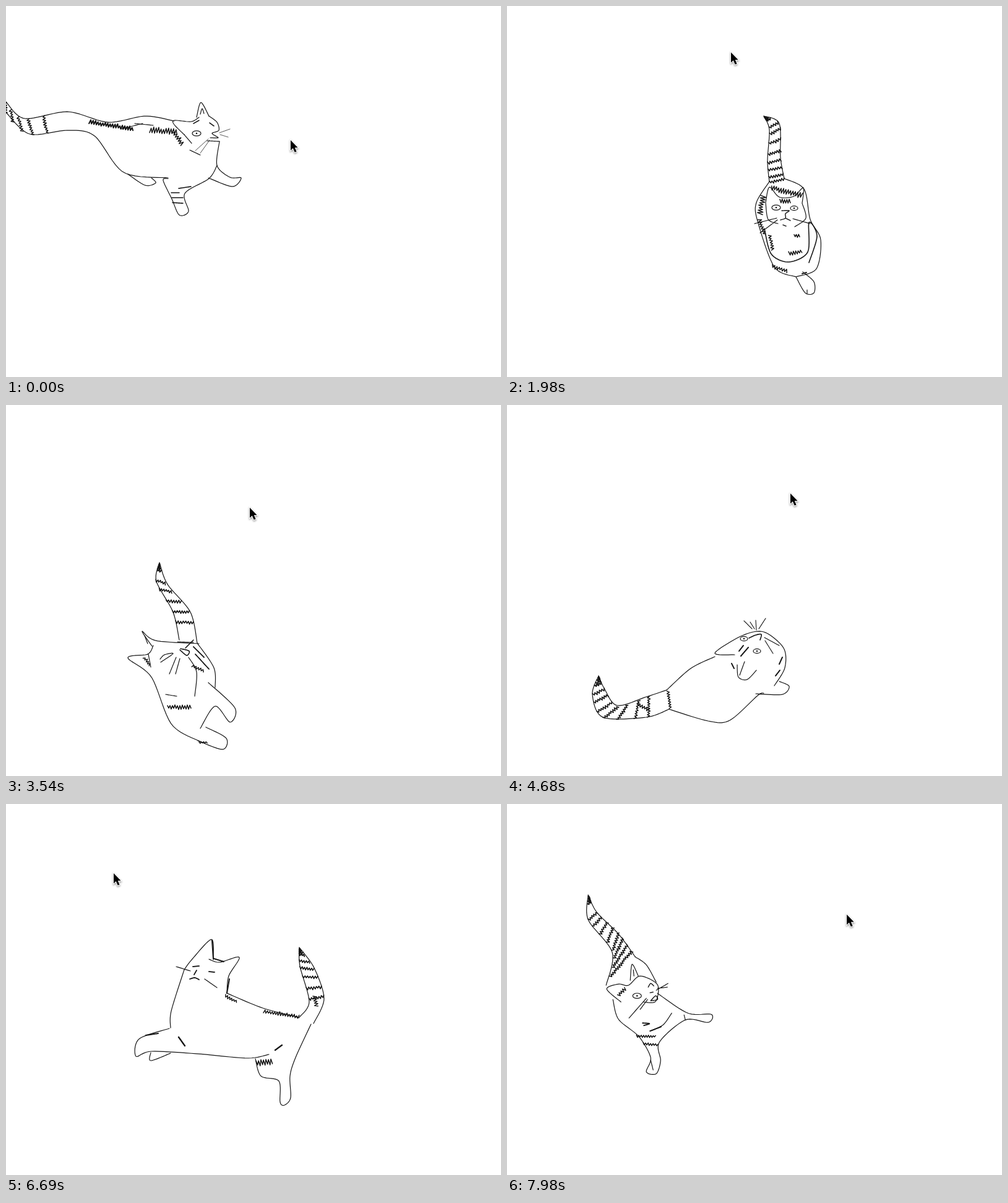
Animation of 800 by 600 pixels, one loop 8 s. Source, as an HTML page with a canvas:

```html
<!DOCTYPE html>
<html>
<head>
<meta charset="utf-8">
<title>Cat and pointer</title>
<style>
html, body { margin: 0; width: 100%; height: 100%; overflow: hidden; background: #fff; }
canvas { display: block; width: 100vw; height: 100vh; }
</style>
</head>
<body>
<canvas id="stage" width="800" height="600"></canvas>
<script>
const ctx = document.getElementById("stage").getContext("2d");
const LOOP = 8000, STEP = 30;

const mix = (a, b, u) => a + (b - a) * u;

function points(text) {
  const n = text.trim().split(/\s+/).map(Number);
  return n.filter((v, i) => i % 2 === 0).map((x, i) => [x, n[i * 2 + 1]]);
}

// Point on a smooth curve through p; u runs over the whole curve.
function along(p, u) {
  const last = p.length - 1;
  const i = Math.min(last - 1, Math.floor(u * last)), s = u * last - i;
  const at = k => p[Math.max(0, Math.min(last, k))];
  const [a, b, c, d] = [at(i - 1), at(i), at(i + 1), at(i + 2)];
  return [0, 1].map(k => {
    const m = (c[k] - a[k]) * 0.45, n = (d[k] - b[k]) * 0.45;
    const e = c[k] - b[k];
    return b[k] + m * s + (3 * e - 2 * m - n) * s * s + (m + n - 2 * e) * s ** 3;
  });
}

// Pen strokes through "x y x y"; "/" lifts the pen.
function ink(text, width = 1.2) {
  ctx.lineWidth = width;
  ctx.beginPath();
  for (const part of text.split("/")) {
    const p = points(part), n = p.length * 8;
    ctx.moveTo(...p[0]);
    for (let i = 1; i <= n; i++) ctx.lineTo(...along(p, i / n));
  }
  ctx.stroke();
}

// Scribbled zigzag with teeth of height h to one side.
function fur(x0, y0, x1, y1, h, width = 1.5) {
  const dx = x1 - x0, dy = y1 - y0, len = Math.hypot(dx, dy);
  const total = Math.max(4, Math.round(len / 2));
  ctx.lineWidth = width;
  ctx.beginPath();
  for (let i = 0; i <= total; i++) {
    const noise = Math.abs(Math.sin(i * 12.9 + x0) * 43.7) % 1;
    const k = h / len * (i % 2 ? 0.65 + noise * 0.4 : noise * 0.2);
    ctx.lineTo(mix(x0, x1, i / total) - dy * k, mix(y0, y1, i / total) + dx * k);
  }
  ctx.stroke();
}

// Two tail edges with a dark tip and rings between them.
function tail(left, right, rings, from, to, tip = true, inset = 0) {
  ink(left);
  ink(right);
  const a = points(left), b = points(right);
  const rung = (u, h, width) => {
    const p = along(a, u), q = along(b, u);
    fur(mix(p[0], q[0], inset), mix(p[1], q[1], inset),
      mix(q[0], p[0], inset), mix(q[1], p[1], inset), h, width);
  };
  for (let i = 0; i < rings; i++) rung(mix(from, to, i / (rings - 1)), 5, 1.6);
  if (tip) for (let i = 1; i < 5; i++) rung(i * 0.035, 4, 2);
}

function eye(x, y, r) {
  ctx.lineWidth = 1.2;
  ctx.beginPath();
  ctx.ellipse(x, y, r, r * 0.6, 0, 0, 7);
  ctx.stroke();
  ctx.beginPath();
  ctx.arc(x, y, 1.3, 0, 7);
  ctx.fill();
}

const poses = {
  side() {
    tail("0 155 30 182 100 171 165 188 225 178 272 186",
      "0 172 38 207 100 201 143 210 190 269 262 278", 5, 0.02, 0.3, false);
    ink("197 272 225 290 242 286 235 278");
    ink("262 279 254 282 268 312 280 338 295 332 289 303 328 279 341 258");
    ink("345 219 341 258 362 277 380 278 366 292 327 278");
    ink("267 302 280 302 / 268 310 286 310 / 269 318 286 319 / 279 295 299 292", 1.6);
    ink("288 208 272 192 272 185 299 187 312 180 / 308 180 315 156 328 178 / 314 175 317 166 320 174");
    ink("328 178 341 188 344 201 333 206 343 213 330 213 / 288 208 300 222 / 325 218 345 219");
    ink("303 190 312 185 / 329 189 336 194", 1.6);
    eye(308, 206, 7);
    ink("327 215 306 234 / 329 217 314 238 / 345 205 362 199 / 346 208 359 212", 0.8);
    ink("297 233 314 241 / 186 199 221 190 / 208 190 238 193");
    fur(134, 191, 205, 202, -7, 2);
    fur(232, 205, 276, 209, -10);
    fur(268, 206, 282, 226, -8);
  },

  front() {
    tail("415 178 424 200 421 250 424 284", "415 178 440 190 442 245 448 279", 8, 0.28, 0.98);
    ink("424 284 403 318 405 348 432 422 467 438 / 448 279 480 296 490 345 507 378 500 425 467 438");
    ink("416 360 427 401 455 414 486 398 488 350 501 372 488 415", 1.6);
    ink("467 438 482 464 496 464 496 446 478 430 / 485 466 485 459");
    ink("477 433 484 431", 2);
    ink("418 318 424 293 440 309 463 308 479 294 477 319 / 418 318 422 345 438 352 / 477 319 483 343 465 357");
    eye(435, 326, 7);
    eye(464, 327, 6);
    ink("444 331 456 331 450 336 450 343 442 346 / 450 343 458 347 / 446 354 451 356", 1.4);
    ink("436 343 400 352 / 437 346 409 367 / 462 344 490 352");
    fur(441, 312, 458, 312, 7);
    fur(428, 290, 478, 302, 9);
    fur(409, 306, 404, 336, -10);
    fur(405, 346, 414, 370, -6);
    fur(422, 371, 427, 395, -5);
    fur(464, 369, 473, 369, 5);
    fur(455, 397, 476, 394, 7);
    fur(429, 418, 454, 426, 6);
  },

  lean() {
    tail("248 255 243 285 270 335 280 380", "248 255 261 290 298 335 309 385", 5, 0.3, 0.76);
    ink("236 390 220 366 242 381 312 386 / 238 389 229 403 197 409 235 440 268 517 318 546");
    ink("310 543 350 557 356 539 323 521 / 314 523 338 487 362 513 370 490 327 449");
    ink("309 385 336 425 338 457 / 230 403 234 424 / 224 373 229 386");
    ink("249 411 256 404 270 402 250 416 / 275 408 264 435 / 281 410 274 435 / 277 383 303 384");
    ink("281 396 292 405 296 398 282 394 / 290 393 303 380", 1.6);
    ink("295 408 308 432 305 471 / 258 468 276 471");
    ink("303 391 320 408 / 306 403 328 427", 1.8);
    fur(300, 424, 319, 432, -5);
    fur(221, 410, 231, 422, -5);
    fur(261, 485, 299, 485, 8);
    fur(312, 545, 325, 544, 3);
  },

  lookup() {
    tail("148 438 138 468 155 505 225 505 262 492", "148 438 157 458 178 486 225 472 258 461", 7, 0.24, 0.76);
    fur(212, 481, 230, 490, 6);
    fur(258, 463, 262, 491, -4);
    ink("258 461 297 426 336 407 / 262 492 325 511 360 510 405 470 415 466 / 402 467 445 468 456 455 440 447");
    ink("368 404 336 401 380 373 415 367 447 393 449 425 432 454");
    ink("372 420 374 440 388 444 403 429 / 384 415 376 437");
    eye(383, 378, 6);
    eye(404, 398, 6);
    ink("391 377 402 372 411 371 409 380", 1.6);
    ink("396 362 383 349 / 400 362 393 351 / 403 364 402 348 / 407 362 418 345 / 416 376 440 389 / 417 381 430 402", 1.1);
    ink("375 398 382 389 / 378 406 390 392 / 363 418 367 426 / 434 438 441 429 / 440 419 445 408", 2);
  },

  recline() {
    tail("265 418 275 408 342 403 390 417", "265 418 275 425 350 429 402 455", 7, 0.42, 0.9, false, 0.33);
    ink("390 419 425 378 437 358 / 396 424 429 374");
    fur(392, 423, 408, 404, -5);
    fur(415, 402, 428, 400, -18);
    ink("402 450 412 473 465 474 / 461 481 480 467 497 453 485 436 / 487 438 525 408");
    ink("515 406 548 404 590 380 575 364 546 371 / 555 370 548 330 550 320");
    ink("490 299 520 302 560 303 579 337 567 350 566 333 550 331");
    ink("402 269 420 277 437 281 463 275 / 402 269 420 297 416 310 398 322 433 343 / 430 343 445 361 468 363 / 423 320 428 338");
    ink("468 277 485 284 491 299 516 315 516 340 506 345 / 448 314 452 304 458 312 / 446 315 446 330 458 342", 1.4);
    ink("472 277 478 266 / 475 278 484 266 / 479 280 494 262");
    ink("453 281 458 285 / 471 288 475 285 / 478 289 480 296 / 416 293 418 307 / 500 302 511 308", 2);
    ink("486 390 510 402 486 397", 1.7);
  },

  stride() {
    ink("288 268 300 252 332 219 335 252 / 328 251 345 256 377 248 360 278 357 306");
    ink("333 220 335 250 / 336 250 352 255 / 361 283 357 306 / 226 374 246 371", 2);
    ink("288 268 267 335 266 362 / 264 363 215 380 210 408 235 400 310 404 390 411 425 405 / 234 402 234 415 266 403");
    ink("357 306 415 330 473 345");
    tail("474 232 475 262 490 320 473 346", "474 232 498 265 514 315 497 355", 5, 0.24, 0.62);
    fur(495, 311, 499, 328, -6);
    ink("493 356 468 410 459 440 460 475 450 487 443 482 441 448 412 440 403 412");
    ink("275 263 298 270 / 321 283 341 297");
    ink("302 263 312 262 / 328 271 337 272 / 304 276 308 269 / 297 283 305 281 312 284", 1.8);
    fur(355, 308, 374, 318, 5);
    fur(416, 338, 473, 347, -6);
    fur(404, 414, 430, 412, 12);
    ink("279 377 289 391 / 435 398 446 390", 2.4);
  },

  perch() {
    tail("131 147 131 187 170 240 160 293", "131 147 145 175 180 210 207 247", 8, 0.32, 0.88);
    ink("207 247 225 260 241 288 / 199 285 202 259 212 278 / 204 268 205 278");
    ink("184 320 161 299 180 291 196 293 215 278 243 292 240 319 220 320");
    eye(210, 310, 7);
    ink("228 296 232 290 237 294 / 231 305 236 304 / 232 318 240 310 243 316 232 318", 1.4);
    ink("225 314 197 346 / 227 316 215 332 / 241 301 260 290 / 243 298 259 296");
    ink("171 316 180 348 213 376 232 410 225 433 241 436 248 415 246 385 288 349 325 353 330 340 292 338 243 306");
    ink("266 338 252 357 231 367 / 232 414 236 430 / 286 341 288 349");
    ink("219 354 230 355 221 358 / 231 367 249 360", 1.9);
    fur(178, 308, 189, 296, 6);
    fur(209, 373, 240, 374, 4);
    fur(220, 385, 244, 388, 4);
  }
};

// until, pose, first offset, last offset (default none)
const moves = [
  [780, "side", 0, 0, 90, 62],
  [1320, "perch", 130, 20, 180, 25],
  [2490, "front", 0, 0],
  [2760, "front", 0, 0, -50, 20],
  [3540, "lean", 60, -80],
  [4080, "lean", 0, 0, -16, 13],
  [4680, "lookup", 43, 10],
  [5340, "lookup", 0, 0, -19, 37],
  [5790, "recline", -60, 50],
  [6240, "recline", 0, 0, 31, 17],
  [6690, "stride", 60, 10],
  [7080, "stride", 0, 0, -40, 3],
  [7500, "front", -190, 15, -230, 5],
  [LOOP, "perch", 20, 20]
];

// time, x, y of the pointer tip
const trail = [
  [0, 460, 217], [810, 681, 108], [1620, 400, 79], [1980, 362, 75],
  [2220, 345, 57], [2850, 522, 105], [3540, 394, 166], [4130, 545, 139],
  [4680, 458, 143], [5220, 420, 162], [5790, 444, 150], [6510, 87, 85],
  [6690, 174, 112], [7380, 516, 125], [7650, 563, 150], [LOOP, 549, 179]
];

function tipAt(t) {
  const i = trail.findIndex(k => t < k[0]);
  const a = trail[i - 1], b = trail[i];
  const u = (t - a[0]) / (b[0] - a[0]), ease = u * u * (3 - 2 * u);
  return [mix(a[1], b[1], ease), mix(a[2], b[2], ease)];
}

const arrow = new Path2D("M0 0V16.4L3.8 12.9L6.6 19.6L9.6 18.4L6.8 11.9H11.6Z");

function pointer(x, y) {
  ctx.save();
  ctx.translate(x, y);
  ctx.lineWidth = 2;
  ctx.strokeStyle = "#fff";
  ctx.shadowColor = "rgba(0,0,0,.45)";
  ctx.shadowBlur = 3;
  ctx.shadowOffsetY = 1.5;
  ctx.stroke(arrow);
  ctx.shadowColor = "transparent";
  ctx.fillStyle = "#000";
  ctx.fill(arrow);
  ctx.restore();
}

function draw(now) {
  const t = Math.floor((now % LOOP) / STEP) * STEP;
  const i = moves.findIndex(m => t <= m[0]);
  const [end, pose, x0, y0, x1 = 0, y1 = 0] = moves[i];
  const start = i ? moves[i - 1][0] : 0;
  const u = Math.min(1, (t - start) / (end - STEP / 2 - start));
  ctx.fillStyle = "#fff";
  ctx.fillRect(0, 0, 800, 600);
  ctx.save();
  ctx.translate(mix(x0, x1, u), mix(y0, y1, u));
  ctx.strokeStyle = ctx.fillStyle = "#151515";
  ctx.lineCap = ctx.lineJoin = "round";
  poses[pose]();
  ctx.restore();
  pointer(...tipAt(t));
}

let begin;
function tick(now) {
  if (begin === undefined) begin = now;
  draw(now - begin);
  requestAnimationFrame(tick);
}
draw(0);
requestAnimationFrame(tick);
</script>
</body>
</html>
```
